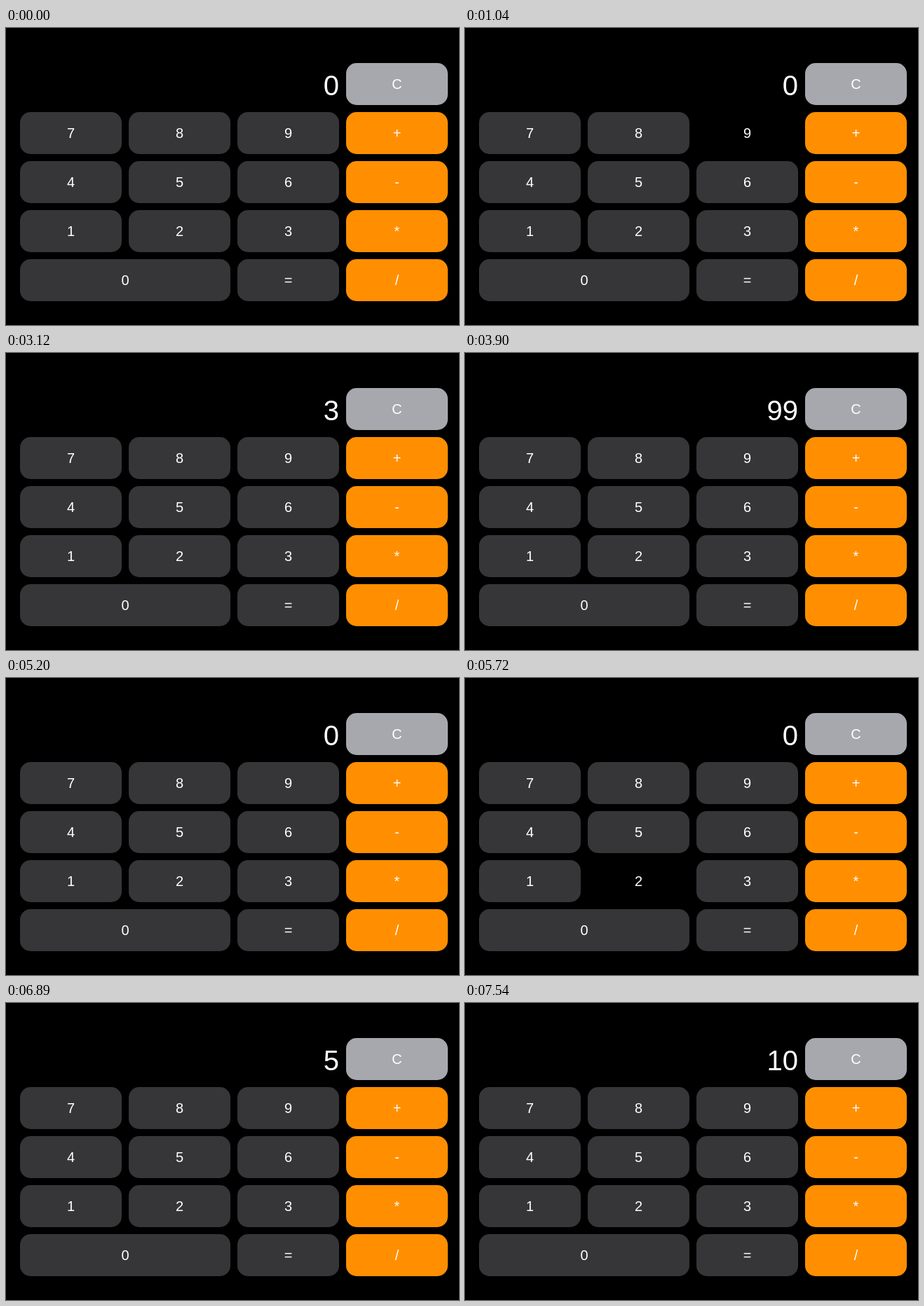
Recreate the animation shown at these times as an HTML page with a canvas. Size 646 px wide and 424 px high, loop 8 s.

```html
<!DOCTYPE html>
<html lang="en">
<head>
<meta charset="utf-8">
<title>Calculator</title>
<style>
  html, body { margin: 0; width: 100%; height: 100%; overflow: hidden; background: #000; }
  canvas { display: block; }
</style>
</head>
<body>
<canvas id="stage" width="646" height="424"></canvas>
<script>
const ctx = document.getElementById('stage').getContext('2d');
const LOOP = 8000;
const FONT = '"Liberation Sans", Arial, sans-serif';
const DARK = '#363538', ORANGE = '#ff8f00', GRAY = '#a7a8ae';

// One string per row; a space leaves the cell to its neighbour.
const ROWS = ['   C', '789+', '456-', '123*', '0 =/'];

// [time, display value, pressed key]
const STEPS = [
  [0, '0'],
  [1040, '0', '9'],
  [1170, '9'],
  [1430, '9', '6'],
  [1560, '96'],
  [3120, '3'],
  [3770, '3', '='],
  [3900, '99'],
  [5200, '0'],
  [5720, '0', '2'],
  [5850, '2'],
  [6240, '2', '*'],
  [6370, '2'],
  [6890, '5'],
  [7410, '5', '='],
  [7540, '10']
];

function keyColor(key) {
  if (key === 'C') return GRAY;
  return '+-*/'.includes(key) ? ORANGE : DARK;
}

function text(str, x, y, size, align) {
  ctx.font = `${size}px ${FONT}`;
  ctx.textAlign = align;
  ctx.fillStyle = '#fff';
  ctx.fillText(str, x, y);
}

function drawKey(key, col, row, pressed) {
  const x = 20 + col * 155, y = 50 + row * 70;
  const w = key === '0' ? 300 : 145;
  if (!pressed) {
    ctx.fillStyle = keyColor(key);
    ctx.beginPath();
    ctx.roundRect(x, y, w, 60, 15);
    ctx.fill();
  }
  text(key, x + w / 2, y + 37, 20, 'center');
}

function draw(t) {
  const [, value, pressed] = STEPS.findLast(step => step[0] <= t);
  ctx.fillStyle = '#000';
  ctx.fillRect(0, 0, 646, 424);
  text(value, 475, 96, 40, 'right');
  ROWS.forEach((keys, row) => {
    [...keys].forEach((key, col) => {
      if (key !== ' ') drawKey(key, col, row, key === pressed);
    });
  });
}

const start = performance.now();
function tick() {
  draw((performance.now() - start) % LOOP);
  requestAnimationFrame(tick);
}
tick();
</script>
</body>
</html>
```
